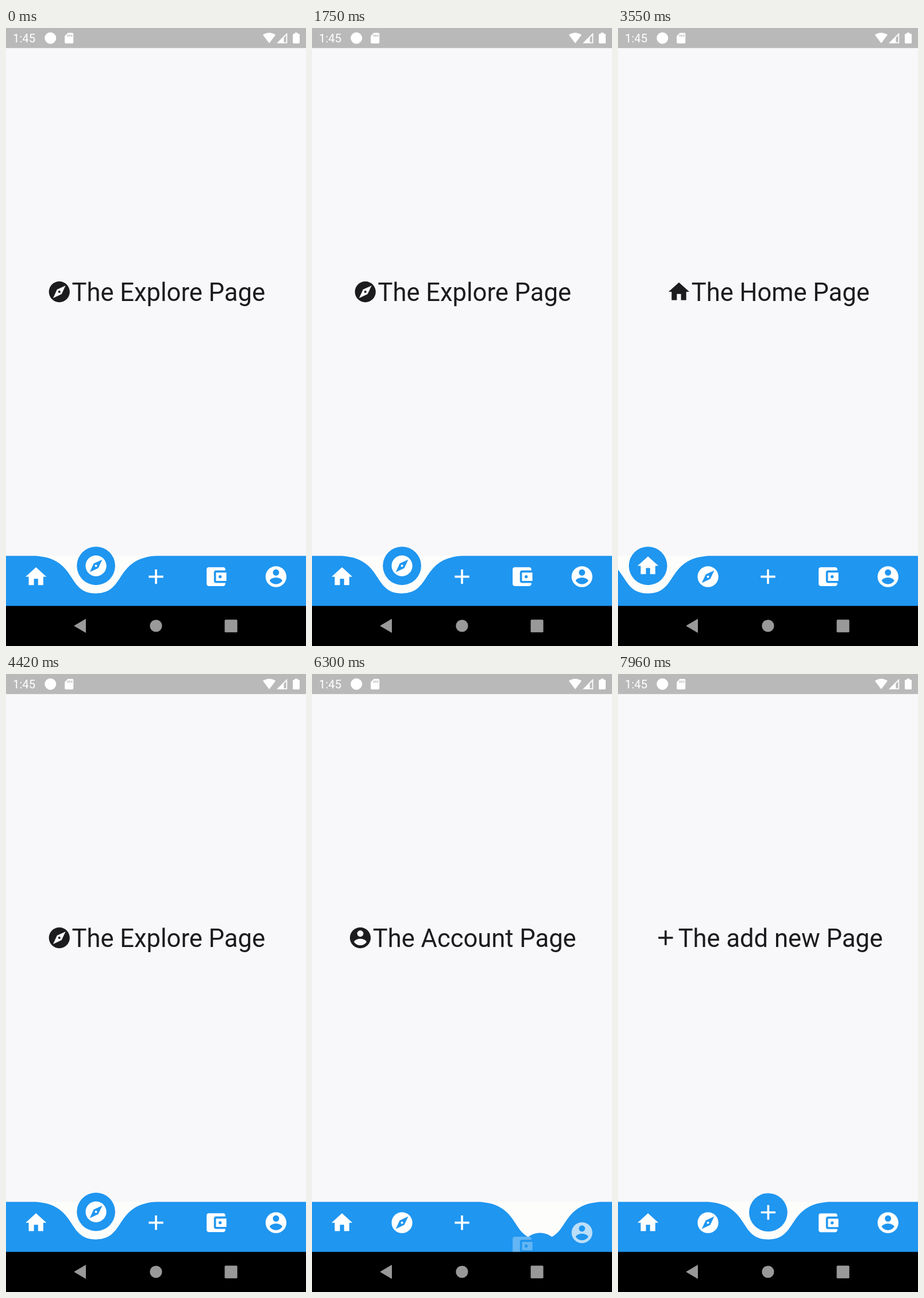
An HTML page for the animation above (8 s loop, 522 px wide and 1073 px high).

```html
<!DOCTYPE html>
<html lang="en">
<head>
<meta charset="utf-8">
<title>Curved navigation bar</title>
<style>
  html, body { margin: 0; width: 100%; height: 100%; overflow: hidden; background: #f8f8fa; }
  svg { display: block; width: 100%; height: 100%; }
  text { font-family: Roboto, "Open Sans", sans-serif; }
</style>
</head>
<body>
<svg viewBox="0 0 522 1073">
  <defs id="icons"></defs>
  <rect width="522" height="1073" fill="#f8f8fa"/>

  <!-- status bar -->
  <rect width="522" height="34.8" fill="#b9b9ba"/>
  <g fill="#fff">
    <text x="12" y="25" font-size="20.3">1:45</text>
    <circle cx="77.3" cy="17.5" r="10"/>
    <path fill-rule="evenodd" d="M107.500 8.500H115.500a1.800 1.800 0 0 1 1.800 1.800V25a1.800 1.800 0 0 1-1.800 1.800H104a1.800 1.800 0 0 1-1.800-1.800V14zM107 11.500v3.500h1.700v-3.500zm3.300 0v3.500h1.700v-3.500zm3.300 0v3.500h1.700v-3.500z"/>
    <path d="M447 12Q458 4.500 469 12L458 26.500z"/>
    <path fill-rule="evenodd" d="M471 26.500L489.300 8.200V26.500zM483.500 16.800V24.700H487.500V12.800z"/>
    <path d="M502.500 8h5v2h2a1.500 1.500 0 0 1 1.500 1.500V25.300a1.500 1.500 0 0 1-1.500 1.500h-9a1.500 1.500 0 0 1-1.500-1.500V11.500a1.500 1.500 0 0 1 1.500-1.500h2z"/>
  </g>

  <!-- page -->
  <g fill="#1c1c1e">
    <use id="pageIcon"/>
    <text id="title" x="282.75" y="474" font-size="43.5" text-anchor="middle"></text>
  </g>

  <!-- curved bar -->
  <rect y="916.4" width="522" height="87" fill="#fdfdfc"/>
  <g id="button">
    <circle r="33.35" fill="#1f96f0"/>
    <use id="buttonIcon" fill="#fff"/>
  </g>
  <path id="bar" fill="#1f96f0"/>
  <g id="row" fill="#fff"></g>

  <!-- system buttons -->
  <rect y="1003.4" width="522" height="70" fill="#000"/>
  <g fill="#999">
    <path d="M119 1038L138.500 1026.500V1049.500z" stroke="#999" stroke-linejoin="round"/>
    <circle cx="261" cy="1038" r="10.600"/>
    <rect x="380.500" y="1027.300" width="22" height="22" rx="1.500"/>
  </g>
</svg>
<script>
const W = 522, LOOP = 8000, MOVE = 300, DP = 1.45, ICON = 30 * DP;
const BAR_TOP = 916.4, ROW_Y = 952.65, BUTTON_Y = 1049.8, STEP = W / 5;

const pages = [
  ["The Home Page", "M10 20v-6h4v6h5v-8h3L12 3 2 12h3v8z"],
  ["The Explore Page", "M12 10.9c-.61 0-1.1.49-1.1 1.1s.49 1.1 1.1 1.1 1.1-.49 1.1-1.1-.49-1.1-1.1-1.1zM12 2C6.48 2 2 6.48 2 12s4.48 10 10 10 10-4.48 10-10S17.52 2 12 2zm2.19 12.19L6 18l3.81-8.19L18 6z"],
  ["The add new Page", "M19 13h-6v6h-2v-6H5v-2h6V5h2v6h6z"],
  ["The Wallet Page", "M21 18v1c0 1.1-.9 2-2 2H5c-1.11 0-2-.9-2-2V5c0-1.1.89-2 2-2h14c1.1 0 2 .9 2 2v1h-9c-1.11 0-2 .9-2 2v8c0 1.1.89 2 2 2zm-9-2h10V8H12zm4-2.5c-.83 0-1.5-.67-1.5-1.5s.67-1.5 1.5-1.5 1.5.67 1.5 1.5-.67 1.5-1.5 1.5z"],
  ["The Account Page", "M12 2C6.48 2 2 6.48 2 12s4.48 10 10 10 10-4.48 10-10S17.52 2 12 2zm0 3c1.66 0 3 1.34 3 3s-1.34 3-3 3-3-1.34-3-3 1.34-3 3-3zm0 14.2c-2.5 0-4.71-1.28-6-3.22.03-1.99 4-3.08 6-3.08s5.97 1.09 6 3.08c-1.29 1.94-3.5 3.22-6 3.22z"]
];

// [time of tap, page tapped]
const taps = [[-MOVE, 1], [400, 0], [1100, 1], [1810, 2], [2510, 1], [3215, 0],
  [3960, 1], [4700, 2], [5447, 3], [6187, 4], [6937, 3], [7675, 2]];

const $ = id => document.getElementById(id);
const move = (el, x, y) => el.setAttribute("transform", `translate(${x} ${y})`);
const setIcon = (el, i) => el.setAttribute("href", "#icon" + i);
const centerX = i => (i + 0.5) * STEP;

$("icons").innerHTML = pages.map(([, d], i) =>
  `<path id="icon${i}" fill-rule="evenodd" transform="scale(${ICON / 24}) translate(-12 -12)" d="${d}"/>`).join("");
$("row").innerHTML = pages.map((_, i) => `<use href="#icon${i}"/>`).join("");
const items = [...$("row").children];

// cubic-bezier(.42, 0, .58, 1)
function easeInOut(x) {
  if (x >= 1) return 1;
  let lo = 0, hi = 1, s;
  for (let n = 0; n < 24; n++) {
    s = (lo + hi) / 2;
    const r = 1 - s;
    if (1.26 * s * r * r + 1.74 * s * s * r + s ** 3 < x) lo = s; else hi = s;
  }
  return s * s * (3 - 2 * s);
}

function barPath(pos) {
  const x = u => (pos + u) * STEP;
  const y = v => BAR_TOP + v * 75 * DP;
  return `M-60 ${y(0)}H${x(-0.5)}
    C${x(0.2)} ${y(0.05)} ${x(0)} ${y(0.6)} ${x(0.5)} ${y(0.6)}
    S${x(0.8)} ${y(0.05)} ${x(1.5)} ${y(0)}
    H600V1025H-60z`;
}

function showPage(i) {
  const title = $("title");
  if (title.textContent !== pages[i][0]) title.textContent = pages[i][0];
  setIcon($("pageIcon"), i);
  move($("pageIcon"), 282.75 - title.getComputedTextLength() / 2 - ICON / 2, 458);
}

function draw(t) {
  const n = taps.findLastIndex(([at]) => at <= t);
  const [at, to] = taps[n];
  const from = n ? taps[n - 1][1] : to;
  const p = easeInOut((t - at) / MOVE);
  const pos = from + (to - from) * p;

  showPage(to);
  $("bar").setAttribute("d", barPath(pos));

  // the button sinks behind the bar halfway and comes back with the new icon
  move($("button"), centerX(pos), BUTTON_Y - Math.abs(1 - 2 * p) * 80 * DP);
  setIcon($("buttonIcon"), p > 0.5 ? to : from);

  items.forEach((el, i) => {
    const far = Math.min(1, Math.abs(pos - i));
    move(el, centerX(i), ROW_Y + (1 - far) * 40 * DP);
    el.setAttribute("opacity", far < 0.99 ? far : 1);
  });
}

const start = performance.now();
function tick() {
  draw((performance.now() - start) % LOOP);
  requestAnimationFrame(tick);
}
tick();
</script>
</body>
</html>
```
